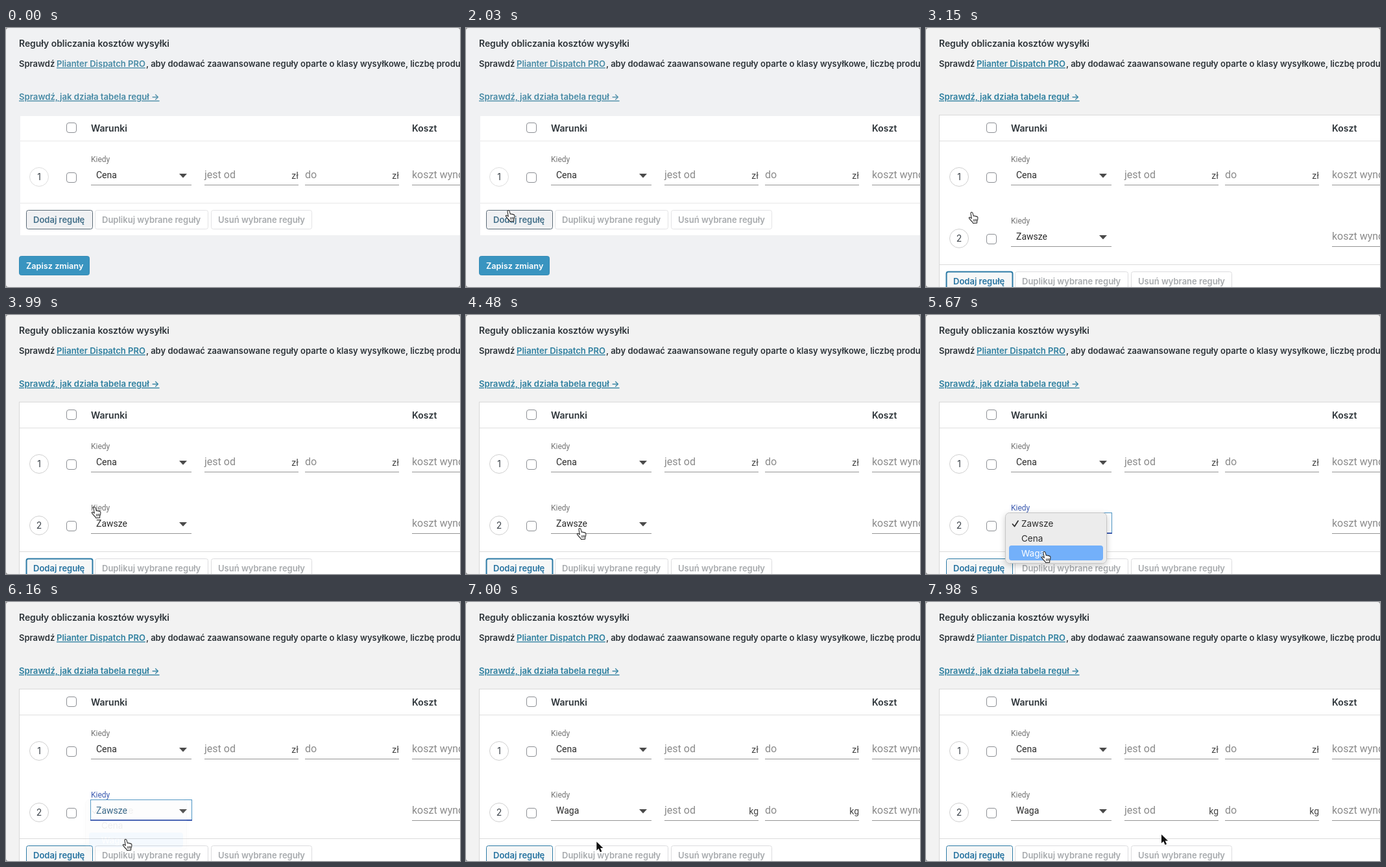
Recreate the animation shown at these times as an HTML page. Size 700 by 400 pixels, loop 8000 ms.

```html
<!DOCTYPE html>
<html lang="pl">
<head>
<meta charset="utf-8">
<title>Reguły wysyłki</title>
<style>
  html, body { margin: 0; width: 100%; height: 100%; overflow: hidden; background: #8b8b8b; }
  svg { display: block; width: 700px; height: 400px; }
  text { font-family: Inter, sans-serif; white-space: pre; }
  .b { font-weight: 600; }
  .r { font-family: Roboto, sans-serif; }
  .link { text-decoration: underline; text-decoration-thickness: 1px; text-underline-offset: 2px; }
</style>
</head>
<body>
<svg id="stage" viewBox="0 0 700 400" xmlns="http://www.w3.org/2000/svg"></svg>
<script>
const LOOP = 8000, STEP = 70;
const ROW_ADDED = 3010, MENU_OPEN = 4550, MENU_FADE = 6020, PICKED = 6230, BLUR = 6860;
const INK = '#2c3338', SOFT = '#8b8b8b', BLUE = '#3c5bb0';

// cursor keys: time, tip x, tip y
const PATH = [
  [1540, -16, 362], [2030, 66, 282], [2310, 71, 285],
  [3640, 71, 285], [3990, 137, 297], [4480, 176, 330],
  [5320, 176, 330], [5670, 183, 366], [5810, 185, 367],
  [6440, 185, 367], [7210, 205, 371], [7630, 205, 371], [7980, 363, 359]
];

const stage = document.getElementById('stage');

const text = (x, y, s, size, fill = INK, cls = '', extra = '') =>
  `<text x="${x}" y="${y}" font-size="${size}" fill="${fill}" class="${cls}" ${extra}>${s}</text>`;
const rect = (x, y, w, h, fill, extra = '') =>
  `<rect x="${x}" y="${y}" width="${w}" height="${h}" fill="${fill}" ${extra}/>`;
const group = (x, y, body, extra = '') => `<g transform="translate(${x} ${y})" ${extra}>${body}</g>`;
const hline = (x, y, w, fill) => rect(x, y, w, 1, fill);

function cursorAt(t) {
  let i = 0;
  while (i < PATH.length - 2 && t > PATH[i + 1][0]) i++;
  const [t0, x0, y0] = PATH[i], [t1, x1, y1] = PATH[i + 1];
  const u = Math.min(1, Math.max(0, (t - t0) / (t1 - t0)));
  const e = u * u * (3 - 2 * u);
  return [x0 + (x1 - x0) * e, y0 + (y1 - y0) * e];
}

function heading(added) {
  const link = added ? '#2d7f9f' : '#478aa5';
  return text(20, 28.5, 'Reguły obliczania kosztów wysyłki', 13.9, INK, 'b') +
    text(20, 60, 'Sprawdź', 13, INK, 'b') +
    text(78, 60, 'Plianter Dispatch PRO', 13, link, 'b link') +
    text(216, 60, ', aby dodawać zaawansowane reguły oparte o klasy wysyłkowe, liczbę produktów', 13, INK, 'b') +
    text(20, 111, 'Sprawdź, jak działa tabela reguł →', 13.15, link, 'b link');
}

const checkbox = y =>
  rect(93.5, y - 7.5, 15, 15, '#fff', 'rx="3.5" stroke="#8c8f94"');

const field = (x, hint, unit) =>
  text(x, 232, hint, 16, SOFT, 'r') + hline(x, 242, 145, '#949494') +
  text(x + 145, 233, unit, 14, '#444', 'r', 'text-anchor="end"');

function row(n, value, unit, focus, ring) {
  let s = `<circle cx="51" cy="230" r="14.5" fill="#fff" stroke="${ring}"/>` +
    text(51, 235, n, 14, '#3c434a', '', 'text-anchor="middle"') +
    checkbox(231) +
    text(131, 207, 'Kiedy', 12, focus ? BLUE : '#757575', 'r');
  s += focus
    ? rect(130.5, 210.5, 156, 32, '#fff', 'stroke="#4c94c4"') + rect(130, 241, 157, 2, BLUE)
    : hline(131, 242, 155, '#949494');
  s += text(139, 232, value, 14, focus ? '#35678a' : '#2b2b2b', 'r') +
    '<path d="M267 225h12l-6 6.5z" fill="#4a4a4a"/>';
  if (unit) s += field(306, 'jest od', unit) + field(461, 'do', unit);
  return s + text(626, 232, 'koszt wynosi', 16, SOFT, 'r') + hline(626, 242, 80, '#949494');
}

function button(x, w, label, fill, border, color, sw = 1) {
  return rect(x + .5, 281.5, w - 1, 29, fill, `rx="3" stroke="${border}" stroke-width="${sw}"`) +
    text(x + 11, 301, label, 13, color, 'b');
}

function footer(t) {
  const added = t >= ROW_ADDED;
  const main = !added ? ['#f0f1f3', '#5b6b77', '#44708a']
    : ['#f6f7f7', '#2c7ba6', '#2673a0', t < MENU_OPEN ? 2 : 1];
  const idle = ['#fff', added ? '#dcdcde' : '#e3e3e5', '#a7aaad'];
  return hline(added ? 21 : 22, 270, 680, added ? '#dcdcdc' : '#e8e8e8') +
    button(31, 103, 'Dodaj regułę', ...main) +
    button(137, 175, 'Duplikuj wybrane reguły', ...idle) +
    button(316, 156, 'Usuń wybrane reguły', ...idle) +
    rect(20.5, 352.5, 108, 29, '#3994c0', 'rx="3" stroke="#348bb5"') +
    text(31, 372, 'Zapisz zmiany', 12.7, '#fff', 'b');
}

function table(t) {
  const added = t >= ROW_ADDED;
  const ring = added ? '#cfcfcf' : '#dedede';
  let s = added
    ? rect(20.5, 134.5, 690, 281, '#fff', 'stroke="#d8d8d8"')
    : rect(22, 136, 680, 184, '#fff');
  s += hline(added ? 21 : 22, 174, 680, added ? '#e0e0e0' : '#e8e8e8') + checkbox(154) +
    text(131, 160, 'Warunki', 14, INK, 'b') + text(626, 160, 'Koszt', 14, INK, 'b') +
    row(1, 'Cena', 'zł', false, ring);
  if (!added) return s + footer(t);
  const picked = t >= PICKED;
  const second = row(2, picked ? 'Waga' : 'Zawsze', picked ? 'kg' : '', t >= MENU_OPEN && t < BLUR, ring);
  return s + group(0, 95, second + footer(t));
}

function menu(t, tipY) {
  if (t < MENU_OPEN || t >= PICKED) return '';
  const fade = t < MENU_FADE ? 1 : Math.pow(1 - (t - MENU_FADE) / (PICKED - MENU_FADE), 2) * .65;
  const active = Math.min(2, Math.max(0, Math.floor((tipY - 310) / 23)));
  let s = rect(122.5, 305.5, 156, 78, '#ececec', 'rx="6" stroke="#c6c6c6" filter="url(#shade)"') +
    rect(128, 310 + 23 * active, 145, 23, '#73b0fa', 'rx="4"');
  ['Zawsze', 'Cena', 'Waga'].forEach((name, i) => {
    s += text(147, 327 + 23 * i, name, 13.5, i === active ? '#fff' : '#2b2b2b');
  });
  s += `<path d="M133.5 323l3 3.5 5.5-8.5" fill="none" stroke="${active ? '#2b2b2b' : '#fff'}" stroke-width="1.7" stroke-linecap="round" stroke-linejoin="round"/>`;
  return `<g opacity="${fade}">${s}</g>`;
}

const HAND = '<g transform="translate(-.5 -.5) scale(.94)">' +
  '<path d="M-1.7 1.5C-1.7-.5 1-.6 1.5 1.2L3 6.5C3.6 5.4 5.3 5.5 5.6 6.9' +
  'C6.3 5.9 7.8 6.3 8 7.6C8.8 6.9 10 7.5 10 8.7C10.2 11.5 9.7 13.2 8.7 15L8.6 17.7' +
  'L2.2 18.2L1.3 16.2C-.8 14.7-2.6 12.3-4.2 10C-5 8.7-3.6 7.7-2.3 8.6L-.2 10.3Z" ' +
  'fill="#fff" stroke="#222" stroke-width="1.1" stroke-linejoin="round"/>' +
  '<path d="M3.2 11.5l.4 3.8M5.5 11.2l.2 3.9M7.7 11l0 3.8" stroke="#222" fill="none"/></g>';
const ARROW = '<path d="M0 0V13.5L3.2 10.6L5.6 16L8.1 14.9L5.7 9.7H10Z" ' +
  'fill="#111" stroke="#fff" stroke-width="1.2" stroke-linejoin="round" paint-order="stroke"/>';

function draw(t) {
  const [x, y] = cursorAt(t);
  const added = t >= ROW_ADDED;
  stage.innerHTML =
    '<defs><filter id="shade" x="-20%" y="-30%" width="140%" height="160%">' +
    '<feDropShadow dx="0" dy="3" stdDeviation="5" flood-opacity=".2"/></filter></defs>' +
    rect(0, 0, 700, 400, added ? '#f2f2f2' : '#f0f1f3', 'rx="4"') +
    heading(added) + table(t) + menu(t, y) +
    (t < 1610 ? '' : group(x, y, t < 6510 ? HAND : ARROW));
}

let last = -1;
const start = performance.now();
function tick() {
  const now = (performance.now() - start) % LOOP;
  const t = Math.floor(now / STEP) * STEP;
  if (t !== last) draw(last = t);
  requestAnimationFrame(tick);
}
tick();
</script>
</body>
</html>
```
